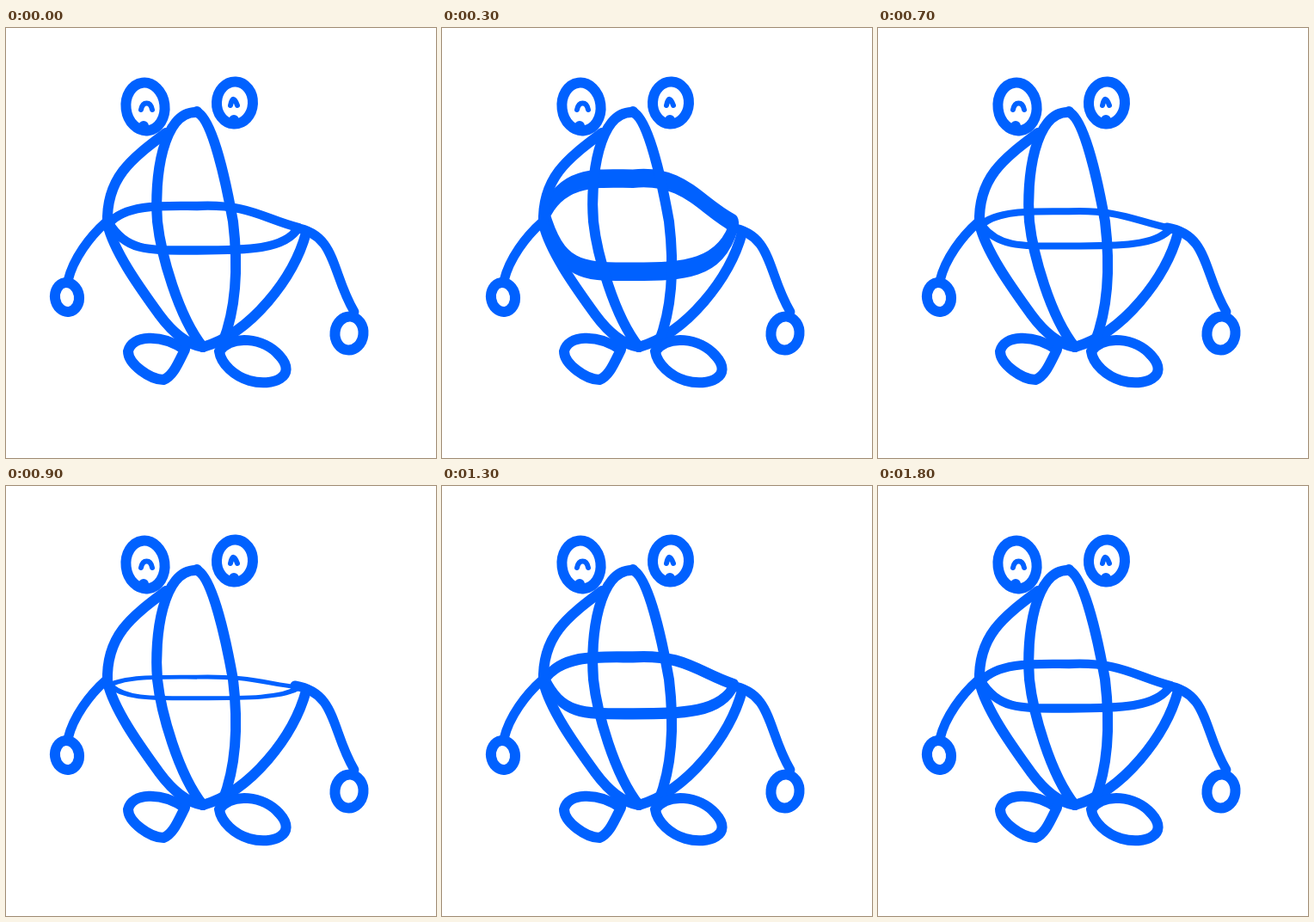
Recreate the animation shown at these times as an HTML page with a canvas. Size 500 by 500 pixels, loop 1900 ms.

```html
<!DOCTYPE html>
<html lang="en">
<head>
<meta charset="utf-8">
<title>Doodle</title>
<style>
  html, body { margin: 0; width: 100%; height: 100%; overflow: hidden; background: #fff; }
  canvas { display: block; width: 500px; height: 500px; }
</style>
</head>
<body>
<canvas id="stage" width="500" height="500"></canvas>
<script>
const ctx = document.getElementById('stage').getContext('2d');
const INK = '#0061ff';
const STEP = 100, STEPS = 19, CYCLE = 12;
const RATIO = 1.28, PIVOT = 236;

function line(d, width = 12) {
  ctx.lineWidth = width;
  ctx.stroke(new Path2D(d));
}

function oval(x, y, rx, ry, tilt = 0) {
  ctx.lineWidth = 12;
  ctx.beginPath();
  ctx.ellipse(x, y, rx, ry, tilt, 0, Math.PI * 2);
  ctx.stroke();
}

// A round blob where the pen rested.
const blot = (x, y) => line(`M${x} ${y}h.01`);

function drawBody() {
  line('M186 122 C146 152 116 174 118 228 C126 262 158 305 178 333 C192 352 210 368 229 371');
  line('M349 238 C335 290 285 355 229 371');
  line('M222 98 C182 96 172 175 176 225 C180 262 200 335 229 371');
  line('M222 98 C240 105 256 180 264 225 C270 275 268 325 252 366');
  blot(222, 97);
}

function drawLimbs() {
  line('M116 226 C98 242 78 268 72 294', 11);
  line('M336 232 C385 240 378 285 405 330', 11);
  oval(71, 313, 14, 17, -0.15);
  oval(399, 355, 16.5, 19.5, 0.1);
  line('M142 376 C146 357 180 355 208 374 C200 390 194 405 183 409 C168 409 142 391 142 376Z');
  line('M248 376 C262 356 300 360 318 381 C340 405 310 418 283 410 C266 405 250 391 248 376Z');
  blot(198, 367);
}

function drawEyes() {
  oval(162, 91.5, 22.5, 28, -0.12);
  oval(266, 87, 21, 24.5, 0.05);
  line('M157 95 C159 85 168 85 170 95', 6);
  line('M261 90 C263 80 266 81 269 90', 6);
  blot(160, 114);
  blot(265, 107);
}

// Belt heights are relative to the pivot, so the pen width stretches too.
function drawBelt(stretch) {
  ctx.save();
  ctx.translate(0, PIVOT);
  ctx.scale(1, stretch);
  line('M120 -9 C140 -32 185 -29 222 -29 C282 -32 300 -14 340 -4' +
       'C325 22 280 22.5 222 22.5 C165 22.5 140 24 120 -9Z', 10.3);
  ctx.restore();
}

function draw(time) {
  const step = Math.floor(time / STEP) % STEPS;
  // Triangle wave: 0, up to 3, down to -3 and back.
  const level = Math.abs((step + 9) % CYCLE - 6) - 3;

  ctx.fillStyle = '#fff';
  ctx.fillRect(0, 0, 500, 500);
  ctx.strokeStyle = INK;
  ctx.lineCap = ctx.lineJoin = 'round';
  drawBelt(RATIO ** level);
  drawBody();
  drawLimbs();
  drawEyes();
}

const start = performance.now();
function tick() {
  draw(performance.now() - start);
  requestAnimationFrame(tick);
}
tick();
</script>
</body>
</html>
```
